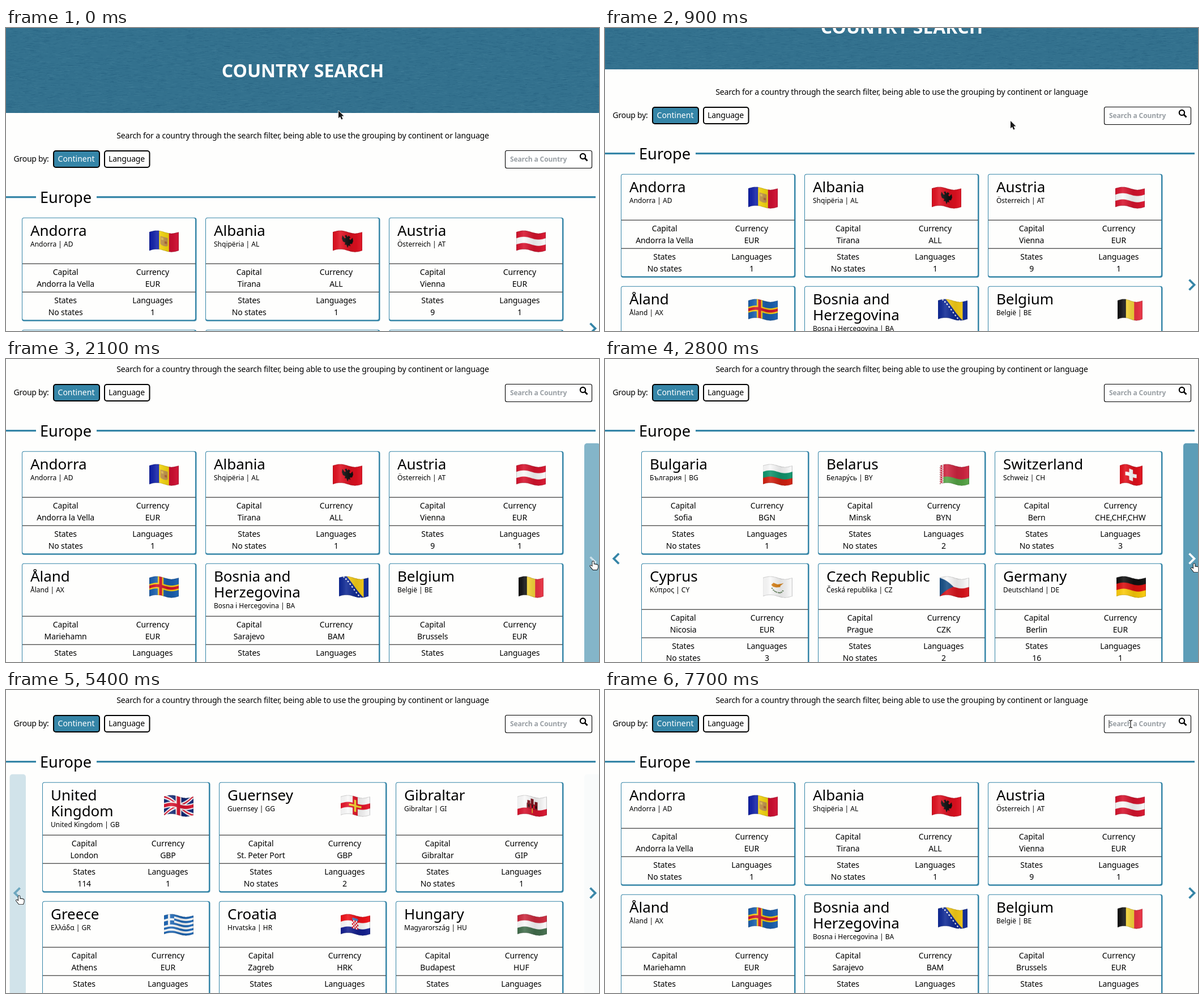
Animation, 1047 px wide and 535 px high, one loop 8 s. Source, as an HTML page with a canvas:

```html
<!DOCTYPE html>
<html lang="en">
<head>
<meta charset="utf-8">
<title>Country search</title>
<style>
html, body { margin: 0; width: 100%; height: 100%; overflow: hidden; background: #fefefd; }
canvas { display: block; }
</style>
</head>
<body>
<canvas id="stage" width="1047" height="535"></canvas>
<script>
(() => {
const W = 1047, H = 535, LOOP = 8000, STEP = 100;
const BLUE = '#3585a7', PAPER = '#fefefd', FONT = '"Noto Sans", "Open Sans", sans-serif';
const ctx = document.getElementById('stage').getContext('2d');
ctx.imageSmoothingQuality = 'high';

// name | native name | code | capital | currency | states | languages
const PAGES = [
  ['Andorra|Andorra|AD|Andorra la Vella|EUR|No states|1',
   'Albania|Shqipëria|AL|Tirana|ALL|No states|1',
   'Austria|Österreich|AT|Vienna|EUR|9|1',
   'Åland|Åland|AX|Mariehamn|EUR|No states|1',
   'Bosnia and/Herzegovina|Bosna i Hercegovina|BA|Sarajevo|BAM|No states|3',
   'Belgium|België|BE|Brussels|EUR|10|3'],
  ['Bulgaria|България|BG|Sofia|BGN|No states|1',
   'Belarus|Белару́сь|BY|Minsk|BYN|No states|2',
   'Switzerland|Schweiz|CH|Bern|CHE,CHF,CHW|No states|3',
   'Cyprus|Κύπρος|CY|Nicosia|EUR|No states|3',
   'Czech Republic|Česká republika|CZ|Prague|CZK|No states|2',
   'Germany|Deutschland|DE|Berlin|EUR|16|1'],
  ['Denmark|Danmark|DK|Copenhagen|DKK|No states|1',
   'Estonia|Eesti|EE|Tallinn|EUR|No states|1',
   'Spain|España|ES|Madrid|EUR|No states|5',
   'Finland|Suomi|FI|Helsinki|EUR|No states|2',
   'Faroe Islands|Føroyar|FO|Tórshavn|DKK|No states|1',
   'France|France|FR|Paris|EUR|No states|1'],
  ['United/Kingdom|United Kingdom|GB|London|GBP|114|1',
   'Guernsey|Guernsey|GG|St. Peter Port|GBP|No states|2',
   'Gibraltar|Gibraltar|GI|Gibraltar|GIP|No states|1',
   'Greece|Ελλάδα|GR|Athens|EUR|No states|1',
   'Croatia|Hrvatska|HR|Zagreb|HRK|No states|1',
   'Hungary|Magyarország|HU|Budapest|HUF|No states|1']
].map(page => page.map(row => {
  const [name, native, code, capital, currency, states, langs] = row.split('|');
  return { lines: name.split('/'), native, code, capital, currency, states, langs };
}));

// ---- timeline: [time, values...] ----
const SCROLL = [[600, 0], [700, 16], [900, 77], [1100, 150], [1200, 172]];
const POINTER = [
  [200, 587, 146], [500, 674, 160], [600, 674, 160], [900, 716, 164], [1300, 757, 169],
  [1500, 972, 300], [1700, 1028, 350], [2400, 1041, 362], [2800, 1039, 361], [3300, 1039, 361],
  [3400, 1035, 361], [4500, 1035, 361], [4600, 1028, 362], [4900, 600, 380], [5200, 62, 372],
  [5300, 30, 366], [5400, 22, 363], [5900, 22, 363], [6300, 23, 363], [6800, 23, 363],
  [7300, 1026, 160], [7500, 950, 75], [7700, 928, 60]];
const RIGHT = [[1500, 0], [2300, 1], [4600, 1], [5400, .03], [5500, 0], [7200, 0], [7300, .1], [7400, .04], [7500, 0]];
const LEFT = [[5200, 0], [5400, .28], [5800, 1], [6400, 1], [6500, 0]];
const FLIPS = [[0, 0], [2500, 1], [3600, 2], [4500, 3], [5700, 2], [6000, 1], [6500, 0]];

function at(keys, t) {
  const i = keys.findIndex(k => k[0] > t);
  if (i === 0) return keys[0].slice(1);
  if (i < 0) return keys[keys.length - 1].slice(1);
  const a = keys[i - 1], b = keys[i], u = (t - a[0]) / (b[0] - a[0]);
  return a.slice(1).map((v, n) => v + (b[n + 1] - v) * u);
}

// ---- helpers ----
function sheet(w, h) {
  const c = document.createElement('canvas');
  c.width = w; c.height = h;
  return c;
}
function text(s, x, y, size, o = {}) {
  ctx.font = `${o.weight || 400} ${size}px ${FONT}`;
  ctx.letterSpacing = (o.track ?? -.12) + 'px';
  ctx.textAlign = o.align || 'left';
  ctx.fillStyle = o.color || '#000';
  ctx.fillText(s, x, y);
}
function box(x, y, w, h, r, fill, line, lw) {
  ctx.beginPath();
  ctx.roundRect(x, y, w, h, r);
  if (fill) { ctx.fillStyle = fill; ctx.fill(); }
  if (line) { ctx.strokeStyle = line; ctx.lineWidth = lw; ctx.stroke(); }
}
function rect(x, y, w, h, c) {
  ctx.fillStyle = c;
  ctx.fillRect(x, y, w, h);
}

// ---- flags ----
const K = 3, FH = 33;
const RED = '#d8142e', WHITE = '#fafafa', GOLD = '#f8dc30';

function brush(g, w) {
  const b = {
    rect(c, x, y, rw, rh) { g.fillStyle = c; g.fillRect(x, y, rw, rh); },
    rows(...cs) { cs.forEach((c, i) => b.rect(c, 0, i * FH / cs.length, w, FH / cs.length + .3)); },
    cols(...cs) { cs.forEach((c, i) => b.rect(c, i * w / cs.length, 0, w / cs.length + .3, FH)); },
    cross(c, x, lw) { b.rect(c, x - lw / 2, 0, lw, FH); b.rect(c, 0, (FH - lw) / 2, w, lw); },
    poly(c, ...p) {
      g.fillStyle = c;
      g.beginPath();
      for (let i = 0; i < p.length; i += 2) g.lineTo(p[i], p[i + 1]);
      g.fill();
    },
    dot(c, x, y, rx, ry = rx) {
      g.fillStyle = c;
      g.beginPath();
      g.ellipse(x, y, rx, ry, 0, 0, 7);
      g.fill();
    },
    line(c, lw, x1, y1, x2, y2) {
      g.strokeStyle = c; g.lineWidth = lw;
      g.beginPath(); g.moveTo(x1, y1); g.lineTo(x2, y2); g.stroke();
    }
  };
  return b;
}

const FLAGS = {
  AD(b) {
    b.cols('#1020a8', '#fbdc10', '#cf0f32');
    b.rect('#c79a4e', 19.5, 9, 13, 13); b.dot('#c79a4e', 26, 22, 6.5, 3);
    b.rect('#e6c15a', 21, 11, 4, 4); b.rect('#b5643c', 27, 16, 4, 4);
  },
  AL(b) {
    b.rows('#e01020');
    for (const s of [-1, 1]) {
      const x = v => 26 + s * v;
      b.poly('#111', x(0), 9, x(2), 6, x(5), 8, x(3), 11, x(5), 13, x(9), 8, x(10), 14, x(8), 19, x(4), 20, x(5), 24, x(2), 23, x(0), 28);
    }
  },
  AT(b) { b.rows(RED, WHITE, RED); },
  AX(b) { b.rows('#1a5fae'); b.cross('#fbd20f', 20, 10); b.cross('#d0142c', 20, 5); },
  BA(b) {
    b.rows('#102a96');
    b.poly('#f8cf18', 14, 0, 44, 0, 44, FH);
    for (let i = 0; i < 9; i++) b.dot('#fff', 9 + i * 3.7, 1 + i * 4, 1.3);
  },
  BE(b) { b.cols('#111', '#fbdb3c', '#ea3344'); },
  BG(b) { b.rows(WHITE, '#10966e', '#d32010'); },
  BY(b) {
    b.rows('#cf2540', '#cf2540', '#55a545');
    b.rect(WHITE, 0, 0, 7, FH);
    for (let y = 1; y < FH; y += 4) {
      b.dot('#cf2540', 3.5, y + 1, 1.6);
      b.rect('#cf2540', .5, y + 2.5, 1.4, 1.4);
      b.rect('#cf2540', 5.1, y + 2.5, 1.4, 1.4);
    }
  },
  CH(b) { b.rows('#e3101c'); b.rect('#fff', 17, 6.5, 6.5, 20); b.rect('#fff', 10.2, 13.2, 20, 6.5); },
  CY(b) {
    b.rows(WHITE);
    b.poly('#d98218', 15, 15, 19, 11, 26, 12, 37, 7, 31, 13, 31, 15, 24, 18, 18, 18);
    for (const s of [-1, 1]) for (let i = 0; i < 4; i++) b.dot('#53764a', 26 + s * (2 + i * 2.5), 26 - i * i * .55, 1.5, .9);
  },
  CZ(b) { b.rows(WHITE, '#d8141c'); b.poly('#174f86', 0, 0, 25, FH / 2, 0, FH); },
  DE(b) { b.rows('#111', '#dc1010', '#fbcb0a'); },
  DK(b) { b.rows('#c8102e'); b.cross(WHITE, 16, 5); },
  EE(b) { b.rows('#1b76cc', '#111', WHITE); },
  ES(b) { b.rows('#c8141e', '#fbc410', '#fbc410', '#c8141e'); b.rect('#b4532c', 12, 12, 7, 9); },
  FI(b) { b.rows(WHITE); b.cross('#12397f', 19, 8); },
  FO(b) { b.rows(WHITE); b.cross('#1464b4', 19, 9); b.cross('#ee2b3c', 19, 5); },
  FR(b) { b.cols('#14289a', WHITE, '#e8333f'); },
  GB(b) {
    b.rows('#122a78');
    for (const [c, lw] of [[WHITE, 6.5], [RED, 2.2]]) { b.line(c, lw, 0, 0, 52, FH); b.line(c, lw, 52, 0, 0, FH); }
    b.cross(WHITE, 26, 10); b.cross(RED, 26, 6);
  },
  GG(b) {
    b.rows(WHITE); b.cross('#e4152a', 26, 9);
    b.rect(GOLD, 24.3, 6, 3.4, 21); b.rect(GOLD, 15, 14.8, 22, 3.4);
  },
  GI(b) {
    b.rows(WHITE, WHITE, '#d8142e');
    b.rect('#6d1018', 17, 13, 19, 9); b.rect('#d8142e', 18, 14, 17, 7);
    for (const x of [18, 24, 31]) { b.rect('#7d101a', x, x === 24 ? 4 : 8, 5, 12); b.rect('#111', x + 1.5, 15, 2, 5); }
    b.rect('#f2cc2c', 26, 21, 1.3, 8);
  },
  GR(b) {
    for (let i = 0; i < 9; i++) b.rect(i % 2 ? WHITE : '#1d66b4', 0, i * FH / 9, 52, FH / 9 + .2);
    b.rect('#1d66b4', 0, 0, 18.5, 18.4);
    b.rect(WHITE, 7.4, 0, 3.7, 18.4); b.rect(WHITE, 0, 7.3, 18.5, 3.7);
  },
  HR(b) {
    b.rows('#f01018', WHITE, '#141f90');
    b.rect('#4a7fc4', 21, 5, 10, 4);
    for (let i = 0; i < 25; i++) b.rect(i % 2 ? '#fff' : '#e01020', 20.5 + i % 5 * 2.2, 9 + Math.floor(i / 5) * 3, 2.2, 3);
  },
  HU(b) { b.rows('#cd2a3e', WHITE, '#436f4d'); }
};
const NARROW = { BE: 44, DK: 44, CH: 40 };

// Paint flat, then bend column by column and shade the folds.
function wave(code) {
  const w = NARROW[code] || 52, flat = sheet(w * K, FH * K), out = sheet(w * K, 40 * K);
  const f = flat.getContext('2d'), g = out.getContext('2d');
  f.scale(K, K);
  FLAGS[code](brush(f, w));
  f.strokeStyle = 'rgba(0,0,0,.2)';
  f.lineWidth = 1.6;
  f.strokeRect(0, 0, w, FH);
  for (let x = 0; x < w * K; x++) {
    const dy = 3.4 - 2.5 * Math.sin(x / (w * K) * Math.PI * 2);
    g.drawImage(flat, x, 0, 1, FH * K, x, dy * K, 1, FH * K);
  }
  const shade = g.createLinearGradient(0, 0, w * K, 0);
  [[0, '0,0,0,.03'], [.25, '255,255,255,.12'], [.6, '0,0,0,.1'], [.8, '0,0,0,.06'], [1, '255,255,255,.04']]
    .forEach(([p, c]) => shade.addColorStop(p, `rgba(${c})`));
  g.globalCompositeOperation = 'source-atop';
  g.fillStyle = shade;
  g.fillRect(0, 0, w * K, 40 * K);
  return out;
}
const flags = {};
for (const code in FLAGS) flags[code] = wave(code);

// ---- woven banner ----
function weave() {
  const c = sheet(W, 150), g = c.getContext('2d');
  let seed = 7;
  const rnd = () => (seed = seed * 16807 % 2147483647) / 2147483647;
  g.fillStyle = '#33718e';
  g.fillRect(0, 0, W, 150);
  for (let i = 0; i < 9000; i++) {
    g.fillStyle = rnd() < .5 ? 'rgba(20,70,100,.13)' : 'rgba(90,150,175,.11)';
    g.fillRect(Math.floor(rnd() * W), Math.floor(rnd() * 150), 2 + rnd() * 9, 1);
  }
  return c;
}
const banner = weave();

// ---- page parts, in unscrolled coordinates ----
function drawHeading() {
  ctx.drawImage(banner, 0, 0);
  text('COUNTRY SEARCH', 524, 87, 32, { weight: 700, align: 'center', color: '#fff', track: -.05 });
  text('Search for a country through the search filter, being able to use the grouping by continent or language',
    524, 195, 14, { align: 'center', track: -.15 });
  text('Group by:', 13.5, 236, 14, { track: -.25 });
  box(84, 217, 81, 29, 4, BLUE, '#000', 2);
  box(174, 217, 79.5, 29, 4, PAPER, '#000', 2);
  text('Continent', 124, 236, 14, { align: 'center', color: '#fff', track: 0 });
  text('Language', 213, 236, 14, { align: 'center', track: -.2 });
  box(881.5, 216.5, 153, 31, 3, '#fff', '#000', 1.1);
  text('Search a Country', 890, 236, 12, { weight: 700, color: '#999fa4' });
  ctx.strokeStyle = '#000';
  ctx.lineWidth = 2.2;
  ctx.beginPath();
  ctx.arc(1018.5, 226.5, 4.6, 0, 7);
  ctx.stroke();
  ctx.lineWidth = 2.8;
  ctx.beginPath();
  ctx.moveTo(1022, 230);
  ctx.lineTo(1026.5, 234.5);
  ctx.stroke();
  rect(0, 297, 53, 3.2, BLUE);
  rect(160, 297, 881, 3.2, BLUE);
  text('Europe', 60, 309, 27.2, { track: 0 });
}

function drawCard(c, x, y, w, head) {
  const h = head + 101, extra = (c.lines.length - 1) * 28.5;
  box(x, y, w, h, 4, BLUE);
  box(x + 1, y + 1, w - 3.5, h - 3.5, 3, PAPER);
  c.lines.forEach((s, i) => text(s, x + 15, y + 32 + i * 28.5, 26, { track: -.05 }));
  text(`${c.native} | ${c.code}`, x + 15, y + 51 + extra, 12, { track: 0 });
  const f = flags[c.code], off = c.code === 'BA' ? 47 : w > 300 ? 57.5 : 56;
  ctx.drawImage(f, x + w - off - f.width / K / 2, y + 22, f.width / K, f.height / K);
  const left = x + w / 4, right = x + w * 3 / 4 - .5;
  const pair = (a, b, dy) => {
    text(a, left, y + head + dy, 14, { align: 'center' });
    text(b, right, y + head + dy, 14, { align: 'center' });
  };
  rect(x + 1, y + head - 1, w - 3, 1, '#111');
  pair('Capital', 'Currency', 19);
  pair(c.capital, c.currency, 40.5);
  rect(x + 1, y + head + 49, w - 3, 1, '#111');
  pair('States', 'Languages', 69);
  pair(c.states, c.langs, 90);
}

const isTall = row => row.some(c => c.lines.length > 1);

function drawCards(n) {
  const x0 = n ? 64 : 28, w = n ? 296.5 : 308.5, gap = n ? 312 : 324;
  let y = 334.7;
  for (const row of [PAGES[n].slice(0, 3), PAGES[n].slice(3)]) {
    const head = isTall(row) ? 94 : 82;
    row.forEach((c, i) => drawCard(c, x0 + i * gap, y, w, head));
    y += head + 116;
  }
}

function chevron(x, y, dir, hover) {
  const draw = c => {
    ctx.strokeStyle = c;
    ctx.lineWidth = 3.8;
    ctx.beginPath();
    ctx.moveTo(x - dir * 4.5, y - 9);
    ctx.lineTo(x + dir * 4.5, y);
    ctx.lineTo(x - dir * 4.5, y + 9);
    ctx.stroke();
  };
  draw(BLUE);
  if (hover) draw(`rgba(255,255,255,${hover})`);
}

function drawPager(n, left, right) {
  const y = isTall(PAGES[n]) ? 530.5 : 524.5;
  const fill = a => `rgba(53,133,167,${a * .8})`;
  if (right) box(1021, 320.7, 28, 500, 5, fill(right));
  chevron(1036, y, 1, right);
  if (!n) return;
  if (left) box(6.5, 320.7, 28.5, 500, 5, fill(left));
  chevron(20, y, -1, left);
}

// ---- pointers ----
const ARROW = new Path2D('M0 0V13.2L3 10.4L5.2 15.4L7.6 14.4L5.4 9.5H9.5Z');
const HAND = new Path2D('M0 1.2Q1.2 -.6 2.4 1.2V6Q3.8 4.8 5 6.2Q6.4 5.2 7.4 6.6Q9.4 5.8 9.6 8V11.2Q9.2 13.4 8 15.2H1Q-1.4 12.4 -4 9Q-4.2 7.4 -2.4 7.8L0 9.8Z');
const BEAM = new Path2D('M-3 -6.5Q-.6 -6.5 0 -5.2Q.6 -6.5 3 -6.5M0 -5.2V5.2M-3 6.5Q-.6 6.5 0 5.2Q.6 6.5 3 6.5');

function drawPointer(x, y, kind) {
  ctx.save();
  ctx.translate(x, y);
  ctx.lineJoin = 'round';
  if (kind === 'beam') {
    ctx.strokeStyle = '#fff'; ctx.lineWidth = 3; ctx.stroke(BEAM);
    ctx.strokeStyle = '#222'; ctx.lineWidth = 1.3; ctx.stroke(BEAM);
  } else {
    const hand = kind === 'hand';
    ctx.strokeStyle = hand ? '#111' : '#fff';
    ctx.lineWidth = hand ? 1.8 : 1.6;
    ctx.stroke(hand ? HAND : ARROW);
    ctx.fillStyle = hand ? '#fff' : '#1a1a1a';
    ctx.fill(hand ? HAND : ARROW);
  }
  ctx.restore();
}

function render(t) {
  const [scroll] = at(SCROLL, t), [x, y] = at(POINTER, t);
  const [left] = at(LEFT, t), [right] = at(RIGHT, t);
  const page = FLIPS.filter(f => f[0] <= t).pop()[1];
  rect(0, 0, W, H, PAPER);
  ctx.save();
  ctx.translate(0, -Math.round(scroll));
  drawHeading();
  drawCards(page);
  drawPager(page, left, right);
  ctx.restore();
  if (t >= 7700) rect(889.5, 53, 1, 14, '#222');
  const inSearch = y < 76 && x > 881 && t > 7000;
  const onPager = y > 149 && (x > 1021 || (x < 35 && page > 0));
  drawPointer(x, y, inSearch ? 'beam' : onPager ? 'hand' : 'arrow');
}

const start = performance.now();
function tick() {
  const t = (performance.now() - start) % LOOP;
  render(Math.floor(t / STEP) * STEP);
  requestAnimationFrame(tick);
}
tick();
})();
</script>
</body>
</html>
```
